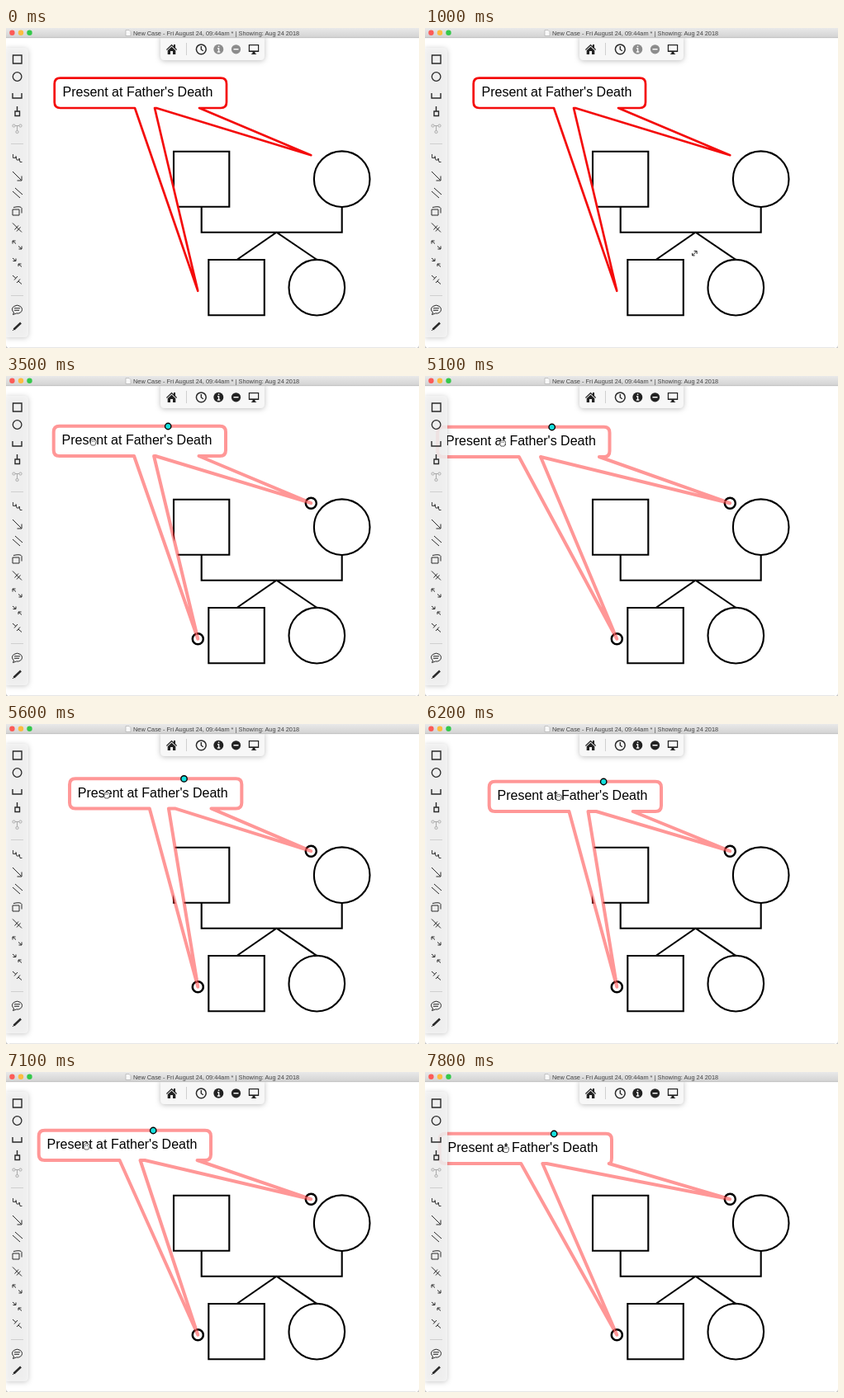
Animation of 500x388 px, one loop 8 s. Source, as an HTML page:

```html
<!DOCTYPE html>
<html lang="en">
<head>
<meta charset="utf-8">
<title>Callout drag</title>
<style>
  html, body { margin: 0; width: 100%; height: 100%; overflow: hidden; background: #fff; }
  svg { display: block; width: 500px; height: 388px; }
  text { font-family: "Liberation Sans", Arial, sans-serif; }
  .line { fill: none; stroke: #000; stroke-width: 2.1; }
  .icon { fill: none; stroke: #2a2a2a; stroke-width: 1; }
  .panel { filter: drop-shadow(0 1px 3px rgba(0, 0, 0, .25)); }
  #callout { fill: #fff; stroke: #f40b0b; stroke-width: 2.7; stroke-linejoin: round; }
  .selected #callout { stroke: rgba(255, 60, 60, .53); stroke-width: 4; }
  .handle { visibility: hidden; }
  .selected .handle { visibility: visible; }
  .action { fill: #8c8c8c; }
  .selected .action { fill: #222; }
</style>
</head>
<body>
<svg id="stage" viewBox="0 0 500 388">
  <defs>
    <linearGradient id="bar" x2="0" y2="1">
      <stop stop-color="#e9e9e9"/><stop offset="1" stop-color="#d2d2d2"/>
    </linearGradient>
  </defs>
  <rect width="500" height="388" fill="#fff"/>

  <g class="line">
    <path d="M203 149.700h67.300v67H203zM245.300 281h67.500v67.300h-67.500zM236.700 217v30.700h170V217M279.500 281l48-33.300L376.500 281"/>
    <circle cx="406.700" cy="183.200" r="33.800"/>
    <circle cx="376.300" cy="314.700" r="33.800"/>
  </g>

  <g class="handle" fill="#fff" stroke="#000" stroke-width="2.500">
    <circle cx="369.300" cy="154.200" r="6.500"/>
    <circle cx="232.300" cy="318.800" r="6.500"/>
  </g>
  <path id="callout"/>
  <g id="label">
    <text x="68.500" y="83.400" font-size="16">Present at Father's Death</text>
    <circle class="handle" cx="197.200" cy="61" r="3.700" fill="#16e0de" stroke="#000" stroke-width="1.400"/>
  </g>

  <g class="panel"><path d="M0 24h22q5 0 5 5v341q0 5-5 5H0z" fill="#f5f5f5" fill-opacity=".85"/></g>
  <path d="M6 140.500h15M6 324.500h15" stroke="#cfcfcf"/>
  <g class="icon">
    <path d="M8.500 33h10.500v10H8.500zM8 79v6h11v-6M13.500 95v6M11 101h5.500v5.500H11z" stroke-width="1.400"/>
    <circle cx="13.600" cy="59" r="5.300" stroke-width="1.300"/>
    <g stroke="#aaa">
      <circle cx="9.500" cy="118.500" r="1.600"/><circle cx="17.500" cy="118.500" r="1.600"/>
      <circle cx="13.500" cy="126" r="1.600"/>
      <path d="M11 118.500h5M13.500 118.500v6"/>
    </g>
    <path d="M8.500 153v4.500h3.500v-2l1 4.500h3v-2l1 4.500h2.500" stroke-width=".9"/>
    <path d="M8 174l10.500 10.500M19 179.500v5.500h-5.500M8 198l9 8M11 194l9 8"/>
    <path d="M8 220h8v7H8zM9 217.500q9-2 10 1v6"/>
    <path d="M8 236.500l11 11M10.500 244.500l4.500-5M13 246.500l4.500-5"/>
    <path d="M8 261.500v-3.500h3.500M8 258l4 3.500M19 264.500v3.500h-3.500M19 268l-4-3.500"/>
    <path d="M8 279l4 3.500M12 279.500v3H8.500M19 289.500l-4-3.500M15 289v-3h3.500"/>
    <path d="M8 300l4 3.500M10 305.500l4-4.500M19 310.500l-4-3.500M13 309l4-4.500"/>
    <path d="M9.500 345q-4-4 0-7.500q4-2.700 8 0q4 4 0 7.500q-2 1.500-5 1l-4 1.500zM10 339.800h7M10 342.300h6"/>
    <path d="M9.500 365.500l8.500-8" stroke-width="2.500"/>
    <path d="M8 367l2-2"/>
  </g>

  <g class="panel"><path d="M187 10h126v24q0 5-5 5H192q-5 0-5-5z" fill="#f7f7f7"/></g>
  <path d="M218.500 18v15" stroke="#cfcfcf"/>
  <g fill="#222">
    <path d="M194 26l6.500-6.200 2.500 2.300V20h2v4l2 2-.8.900-5.700-5.300-5.700 5.300zM195.700 27.200l4.800-4.400 4.800 4.400v4.800h-3.300v-4h-3v4h-3.300z"/>
    <path d="M293.800 20h12.400v9h-12.400zM296.500 32l2-1.500V29h3v1.500l2 1.500z"/>
    <path d="M295 21.200h10v6.200h-10z" fill="#f7f7f7"/>
  </g>
  <g class="icon">
    <circle cx="236.300" cy="25.800" r="5.900" style="stroke-width:1.500"/>
    <path d="M236.300 22v4l2.500 1.800" stroke-width="1.400"/>
  </g>
  <g class="action"><circle cx="257.300" cy="25.800" r="6"/><circle cx="278.500" cy="25.800" r="5.600"/></g>
  <path d="M256 24.800h1.600v4M255.800 29h3.500M256.800 22.300h1.500M275.500 25.800h6" fill="none" stroke="#f7f7f7" stroke-width="1.400"/>

  <rect width="500" height="12" fill="url(#bar)"/>
  <path d="M0 11.700h500" stroke="#b9b9b9" stroke-width=".7"/>
  <circle cx="7.400" cy="5.700" r="3.200" fill="#fc5b57"/>
  <circle cx="18" cy="5.700" r="3.200" fill="#fdbc40"/>
  <circle cx="28.500" cy="5.700" r="3.200" fill="#34c84a"/>
  <path d="M145 2.500h4l2 2v5h-6z" fill="#f8f8f8" stroke="#aaa" stroke-width=".6"/>
  <text x="154" y="8.700" font-size="7.370" fill="#444">New Case - Fri August 24, 09:44am * | Showing: Aug 24 2018</text>
  <path d="M0 384q0 4 4 4H0zM500 384q0 4-4 4h4z" fill="#c4c4c4"/>
  <path d="M4 387.700h492" stroke="#ccc" stroke-width=".6"/>

  <g id="arrow">
    <path d="M-3 3L2-2M-1.500-3H3v4.500M-3-.5V3H.5" fill="none" stroke="#fff" stroke-width="2.200"/>
    <path d="M-3 3L2-2M-1-2.500h3.500V1M-3 0v3H0" fill="none" stroke="#222"/>
  </g>
  <path id="hand" d="M-3-1q-.5-2 1-2q.8-1.200 2-.5q1.200-.7 2 .5q1.700 0 1.500 2q0 3-1.500 4.500h-4Q-4 1.500-3-1zM-1-2v1.500M1-2v1.500" fill="#fff" stroke="#333" stroke-width=".8"/>
</svg>
<script>
  const LOOP = 8000, STEP = 100, GRAB = 2300, LEAD = 100;
  const $ = id => document.getElementById(id);

  // Each key: time, x, y
  const pointerKeys = [
    [100, 340, 255], [400, 335, 257], [700, 335, 257], [900, 335, 281],
    [1500, 210, 160], [2000, 126, 82]
  ];
  const dragKeys = [
    [2300, 0, 0], [2600, -14, 1], [2900, -40, 2], [3250, 24, 1], [3500, -1, 0],
    [3700, -42, 1], [4050, 24, 2], [4400, -43, 3], [4750, 20, 2], [5100, -43.5, 1],
    [5500, 28, 5], [5900, -38, 8], [6200, 19, 9], [6350, 40, 9], [6700, -38, 10],
    [6900, 5, 10], [7100, -19, 10], [7300, -40, 11], [7550, 20, 12],
    [7800, -41, 14], [8100, 7, 14]
  ];

  function sample(keys, t) {
    if (t <= keys[0][0]) return keys[0].slice(1);
    const i = keys.findIndex(key => key[0] > t);
    if (i < 0) return keys[keys.length - 1].slice(1);
    const [a, b] = [keys[i - 1], keys[i]];
    const k = (1 - Math.cos(Math.PI * (t - a[0]) / (b[0] - a[0]))) / 2;
    return [1, 2].map(n => a[n] + (b[n] - a[n]) * k);
  }

  // The tips stay put while the roots of both tails slide along the box.
  function calloutPath(dx, dy) {
    const left = 58.7 + dx, right = 267 + dx, top = 60.7 + dy, bottom = 97 + dy, r = 7;
    const tail1Left = 156 - .03 * dx + dx;
    const tail1Right = 180 - .08 * dx + dx;
    const tail2Left = Math.max(tail1Right, 182 + .05 * dx + .6 * dy + dx);
    const tail2Right = Math.min(right - 3, 234 - .45 * dx + .8 * dy + dx);
    return `M${left + r} ${top}H${right - r}Q${right} ${top} ${right} ${top + r}` +
      `V${bottom - r}Q${right} ${bottom} ${Math.max(right - r, tail2Right)} ${bottom}` +
      `H${tail2Right}L369.3 154.2L${tail2Left} ${bottom}H${tail1Right}` +
      `L232.3 318.8L${tail1Left} ${bottom}H${left + r}` +
      `Q${left} ${bottom} ${left} ${bottom - r}V${top + r}Q${left} ${top} ${left + r} ${top}Z`;
  }

  function place(node, x, y, visible = true) {
    node.setAttribute("transform", `translate(${x} ${y})`);
    node.style.visibility = visible ? "" : "hidden";
  }

  function draw(t) {
    const dragging = t >= GRAB;
    const [dx, dy] = sample(dragKeys, t);
    const [leadX, leadY] = sample(dragKeys, t + LEAD);
    $("stage").classList.toggle("selected", dragging);
    $("callout").setAttribute("d", calloutPath(dx, dy));
    place($("label"), dx, dy);
    place($("arrow"), ...sample(pointerKeys, t), t >= 100 && !dragging);
    place($("hand"), 127 + leadX, 80 + leadY, dragging);
  }

  const start = performance.now();
  function tick() {
    const t = (performance.now() - start) % LOOP;
    draw(Math.floor(t / STEP) * STEP);
    requestAnimationFrame(tick);
  }
  tick();
</script>
</body>
</html>
```
